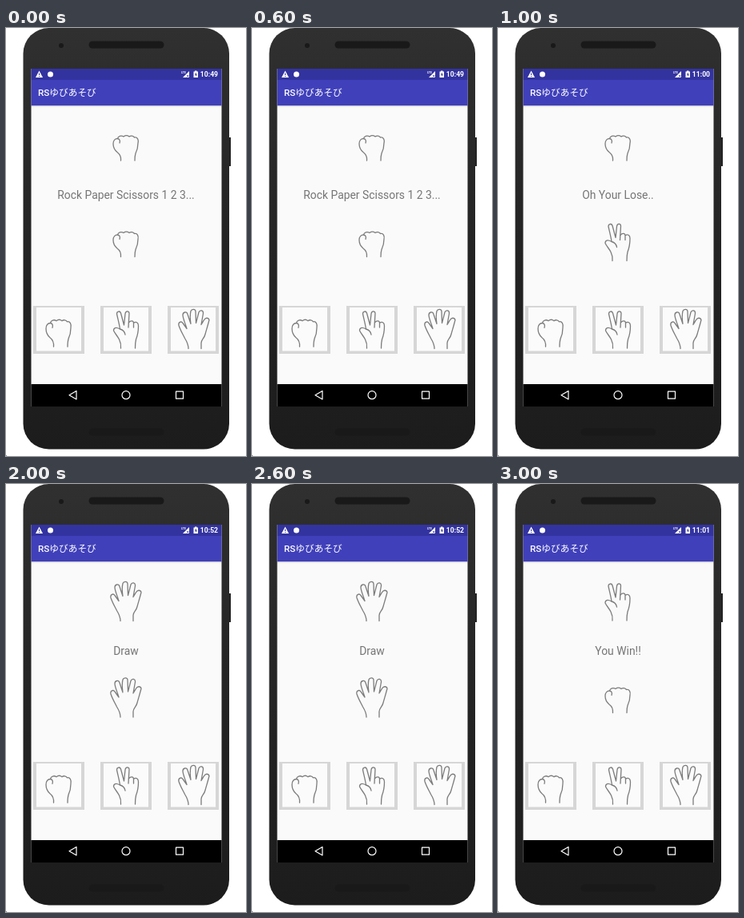
Animation, 300 px wide and 536 px high, one loop 4000 ms. Source, as an HTML page:

```html
<!DOCTYPE html>
<html lang="en">
<head>
<meta charset="utf-8">
<title>Hand game</title>
<style>
html, body { margin: 0; width: 100%; height: 100%; overflow: hidden; background: #fff; }
svg { display: block; width: 100%; height: 100%; }
text { font-family: Roboto, "Noto Sans CJK JP", "Noto Sans CJK", sans-serif; }
.title { font-size: 11.7px; font-weight: 500; fill: #fff; }
.clock { font-size: 8.6px; font-weight: 600; fill: #fff; text-anchor: end; }
.msg { font-size: 13.9px; fill: #757575; text-anchor: middle; }
.hand { fill: none; stroke: #7c7c7c; stroke-width: 1.3; stroke-linecap: round; stroke-linejoin: round; }
.scene { opacity: 0; animation: show 4s step-end infinite; }
.s1 { animation-delay: -4s; }
.s2 { animation-delay: -3s; }
.s3 { animation-delay: -2s; }
.s4 { animation-delay: -1s; }
@keyframes show { 0% { opacity: 1; } 25%, 100% { opacity: 0; } }
</style>
</head>
<body>
<svg viewBox="0 0 300 536">
  <defs>
    <linearGradient id="body" x2="0" y2="1">
      <stop stop-color="#303030"/>
      <stop offset=".4" stop-color="#262626"/>
      <stop offset="1" stop-color="#1c1c1c"/>
    </linearGradient>
    <linearGradient id="shade" x2="0" y2="1">
      <stop stop-color="#000" stop-opacity=".25"/>
      <stop offset="1" stop-color="#000" stop-opacity="0"/>
    </linearGradient>
    <g id="rock" class="hand">
      <path d="M10.500 33C11 28 9.500 25 6 22.500C3 20 1 16 1 12C1 8 3.500 5.500 6.500 5.500C7 2.500 11 1 14 3C16 1.500 19 1.500 21 3C23 1.500 26 2 27.500 4C31 3 33 7 32 11C32 16 31 20 29 24C28 27 28 30 28 33"/>
      <path d="M6.500 5.500C9 6 10 8 9 11"/>
    </g>
    <g id="scissors" class="hand">
      <path d="M9 23C8 16 6 9 5 4C5 .5 9 0 10 3L14 18L15.500 4C16 0 20.500 0 20.500 3.500L19.500 21"/>
      <path d="M20 15C22 12 26 12 26 15.500V21M26 15.500C29 13 32 15 32 19C32 25 31 31 29 36C28 40 28 44 28 47"/>
      <path d="M9 23C4 20.500 1 21 1 25C3 29 6 32 8 36C10 40 10.500 43 10 47M9 23C13 24 15 27 15.500 30"/>
    </g>
    <g id="paper" class="hand">
      <path d="M13 50C13 45 11 41 8.500 37C6 32 3 27 1 21C0 17 4 15 6 18L11 25C9 18 6 12 6 8C6 4 11 3 12 7L16 19C15 12 15 7 16 3C17 0 22 0 22 3.500L22.500 18C24 13 25 8 26 4.500C27.500 1 32 2 31.500 6L29 20C31 17 32 14 34 12.500C37 10.500 40 13 38.500 16C37 22 35 28 34 32C33 37 29 39 29 43V50"/>
    </g>
    <g id="tile">
      <path fill="#d6d6d6" d="M0 0H64V60H0z"/>
      <path fill="#fbfbfb" d="M4 2H60V56.500H4z"/>
    </g>
  </defs>

  <!-- phone -->
  <path fill="#222" d="M278 137h3v36h-3z"/>
  <rect x="21.500" y="0" width="257.500" height="527.500" rx="32" fill="url(#body)"/>
  <g fill="#191919">
    <rect x="103.500" y="16.500" width="94" height="9" rx="4.500"/>
    <rect x="103.500" y="501.500" width="94" height="9" rx="4.500"/>
    <circle cx="69" cy="22" r="3"/>
  </g>
  <path fill="#888" d="M0 535h1v1H0z"/>

  <!-- screen -->
  <path fill="#fafafa" d="M31.500 51h238v423h-238z"/>
  <path fill="url(#shade)" d="M31.500 97h238v2h-238z"/>
  <path fill="#4040bb" d="M31.500 65h238v32h-238z"/>
  <path fill="#3333a0" d="M31.500 51h238v14h-238z"/>
  <path d="M31.500 446h238v28h-238z"/>
  <text class="title" x="40" y="85">RSゆびあそび</text>

  <!-- status icons -->
  <path fill="#fff" d="M41.500 53.500L46 62H37z"/>
  <path stroke="#3333a0" d="M41.500 56.500v2.500m0 1v1"/>
  <circle cx="55.500" cy="58" r="3.500" fill="#fff"/>
  <path fill="#fff" d="M229 54v8h-8z"/>
  <text x="219" y="57" font-size="3.600" font-weight="700" fill="#fff">LTE</text>
  <path stroke="#3333a0" stroke-width=".8" d="M226 59l2.500 2.500m0-2.500l-2.500 2.500"/>
  <path fill="#fff" d="M234.500 54.500h1.500v-1h2.500v1h1.500v7.500h-5.500z"/>
  <path fill="#3333a0" d="M237.700 55.500l-1.900 3h1.200v2.500l1.900-3.200h-1.200z"/>

  <!-- navigation -->
  <g fill="none" stroke="#fff" stroke-width="1.200" stroke-linejoin="round">
    <path d="M88 454.500v10.500l-9-5.250z"/>
    <circle cx="150" cy="459.700" r="5"/>
    <path d="M212.500 455.200h9v9h-9z"/>
  </g>

  <!-- choices -->
  <use href="#tile" x="34" y="348"/>
  <use href="#tile" x="118" y="348"/>
  <use href="#tile" x="202" y="348"/>
  <use href="#rock" transform="translate(49 363.500) scale(1 1.080)"/>
  <use href="#scissors" x="133.500" y="354"/>
  <use href="#paper" x="215" y="351.500"/>

  <g class="scene s1">
    <text class="clock" x="265" y="61">10:49</text>
    <use href="#rock" x="133" y="133"/>
    <text class="msg" x="150" y="213.500">Rock Paper Scissors 1 2 3...</text>
    <use href="#rock" x="133" y="253.500"/>
  </g>
  <g class="scene s2">
    <text class="clock" x="265" y="61">11:00</text>
    <use href="#rock" x="133" y="133"/>
    <text class="msg" x="150" y="213.500">Oh Your Lose..</text>
    <use href="#scissors" x="133" y="244.500"/>
  </g>
  <g class="scene s3">
    <text class="clock" x="265" y="61">10:52</text>
    <use href="#paper" x="130" y="121.500"/>
    <text class="msg" x="150" y="213.500">Draw</text>
    <use href="#paper" x="130" y="242"/>
  </g>
  <g class="scene s4">
    <text class="clock" x="265" y="61">11:01</text>
    <use href="#scissors" x="133" y="124"/>
    <text class="msg" x="150" y="213.500">You Win!!</text>
    <use href="#rock" x="133" y="253.500"/>
  </g>
</svg>
</body>
</html>
```
